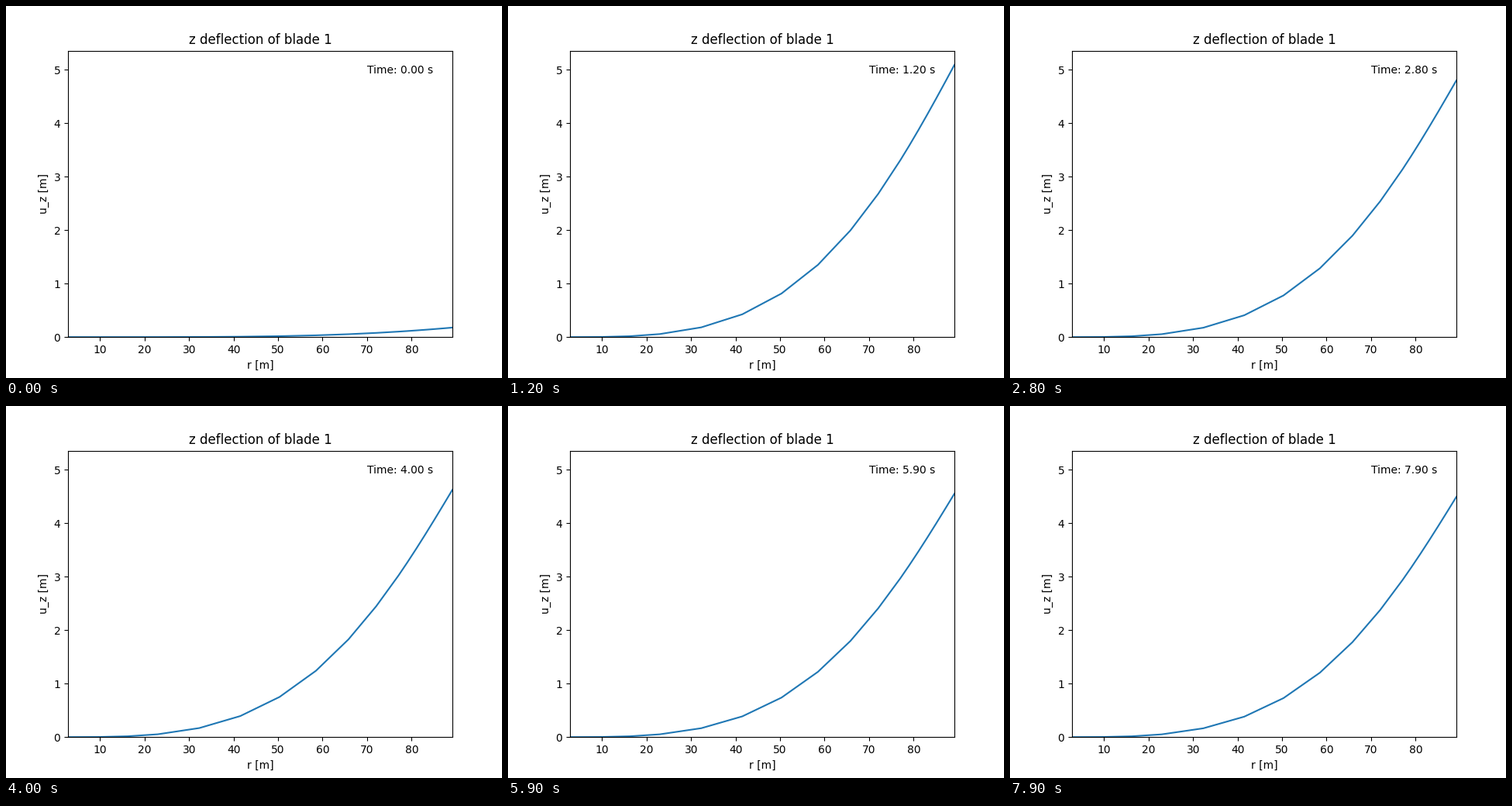
Recreate the animation shown at these times as a matplotlib script. Size 640 by 480 pixels, loop 8000 ms.

```python
import numpy as np
import matplotlib.pyplot as plt
from matplotlib.animation import FuncAnimation

FRAMES = 80
DT = 0.1
Y_MAX = 5.36
ROOT, TIP = 2.8, 89.166

# blade stations [m]: even at both ends, narrowing along a sine in between
middle = 27.63 + 55.66 * np.sin(0.168 * (np.arange(8) - 0.5))
r = np.concatenate([np.linspace(ROOT, middle[0], 4)[:-1],
                    middle,
                    np.linspace(middle[-1], TIP, 7)[1:]])
s = (r - ROOT) / (TIP - ROOT)


def step_response(t, decay=3.9, omega=4.0):
    """Damped second-order response to a unit step."""
    swing = np.cos(omega * t) + decay / omega * np.sin(omega * t)
    return 1 - np.exp(-decay * t) * swing


def tip(t):
    drift = 4.1 + 1.071 * np.exp(-0.147 * t)
    per_turn = 0.07 * np.cos(1.005 * (t - 7.4))
    return (drift + per_turn) * step_response(t + 0.05)


def shape(t):
    """Bending shape, 1 at the tip; the inner blade lags at start-up."""
    lag = 0.15 + 0.87 * np.exp(-t / 0.35)
    return s**3 * (1 + (1 - s) * (0.55 * s**3 - lag))


def deflection(t):
    return tip(t) * shape(t)


fig, ax = plt.subplots(figsize=(6.4, 4.8), dpi=100)
line, = ax.plot(r, deflection(0))
label = ax.text(70, 0.92 * Y_MAX, "")
ax.set_xlim(ROOT, TIP)
ax.set_ylim(0, Y_MAX)
ax.set_xlabel("r [m]")
ax.set_ylabel("u_z [m]")
ax.set_title("z deflection of blade 1")


def update(i):
    t = i * DT
    line.set_ydata(deflection(t))
    label.set_text(f"Time: {t:.2f} s")
    return line, label


anim = FuncAnimation(fig, update, frames=FRAMES, interval=1000 * DT,
                     repeat=True, repeat_delay=0)
plt.show()
```
